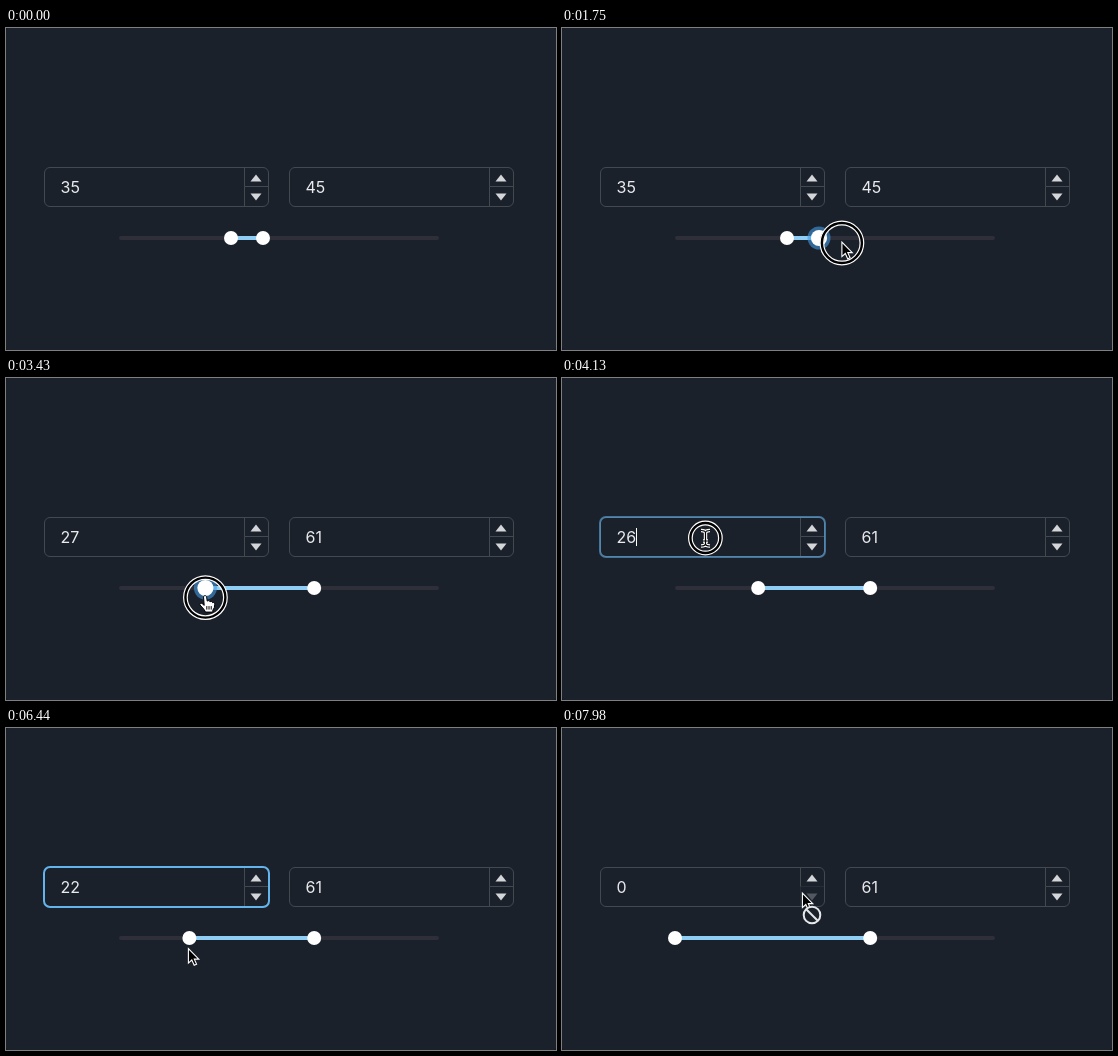
An HTML page with a canvas that plays this animation: 550 px wide and 322 px high, repeating every 8 s.

```html
<!DOCTYPE html>
<html lang="en">
<head>
<meta charset="utf-8">
<title>Range slider with number inputs</title>
<style>
  html, body { margin: 0; width: 100%; height: 100%; overflow: hidden; background: #14181f; }
  canvas { display: block; width: 550px; height: 322px; }
</style>
</head>
<body>
<canvas></canvas>
<script>
const LOOP = 8000, STEP = 70;
const BG = '#1b212b', BORDER = '#434851', BLUE = '#63b3ed';
const TRACK_X = 113, TRACK_Y = 210, UNIT = 3.2;
const canvas = document.querySelector('canvas');
const ctx = canvas.getContext('2d');
const dpr = window.devicePixelRatio || 1;
canvas.width = 550 * dpr;
canvas.height = 322 * dpr;

// Stops of the pointer: [time, x, y], eased in between
const stops = [
  [140, 236, 304], [280, 283, 251], [490, 283, 251], [1260, 263, 209],
  [1540, 262, 210], [1750, 279.5, 213], [1890, 279.5, 213], [2030, 257, 215],
  [2660, 308, 217.5], [2730, 308, 217.5], [3150, 225, 214], [3500, 196, 218],
  [4060, 143, 160], [4130, 143, 160], [4340, 9, 155], [6090, 60, 165],
  [6440, 182, 219.5], [6580, 183, 212], [7140, 96.5, 204], [7420, 491, 165],
  [7700, 266, 149], [7910, 266, 149], [7980, 240, 164],
];

// Each press moves the focus to what lies under the pointer
const presses = [
  { from: 1540, to: 2730, on: 'high' },
  { from: 3150, to: 3570, on: 'low' },
  { from: 4060, to: 4410, on: 'input' },
  { from: 6580, to: 7210, on: 'low' },
  { from: 7770, to: 7980, on: 'page' },
];
const textPress = presses[2], lastDrag = presses[3];

const clamp = (v, min, max) => Math.max(min, Math.min(max, v));
const between = (t, a, b) => t >= a && t < b;
const mid = v => TRACK_X + v * UNIT;

// Rises from 0 to 1 after a, falls back after b
const ramp = (t, a, b = Infinity) => clamp(Math.min((t - a) / 200, 1 - (t - b) / 200), 0, 1);
const rampFor = (part, t) =>
  Math.max(...presses.filter(p => p.on === part).map(p => ramp(t, p.from, p.to)));

function pointerAt(t) {
  const i = stops.findIndex(s => s[0] > t);
  if (i < 1) return stops.at(i && -1).slice(1);
  const [t0, x0, y0] = stops[i - 1], [t1, x1, y1] = stops[i];
  const p = (t - t0) / (t1 - t0), e = p * p * (3 - 2 * p);
  return [x0 + (x1 - x0) * e, y0 + (y1 - y0) * e];
}

// Value under the pointer during a drag
const dragged = (t, from, to) =>
  Math.round(clamp((pointerAt(clamp(t, from, to))[0] - TRACK_X) / UNIT, 0, 100));

function lowAt(t) {
  if (t >= lastDrag.from) return dragged(t, lastDrag.from, 7140);
  const arrowKeys = clamp(Math.floor((t - 5090) / 185) + 1, 0, 4);
  return dragged(t, 3150, 3500) - arrowKeys;
}
const highAt = t => dragged(t, 2030, 2660);

function polygon(...points) {
  ctx.beginPath();
  for (let i = 0; i < points.length; i += 2) ctx.lineTo(points[i], points[i + 1]);
  ctx.closePath();
}

function line(...points) {
  ctx.beginPath();
  for (let i = 0; i < points.length; i += 2) ctx.lineTo(points[i], points[i + 1]);
  ctx.stroke();
}

function box(x, y, w, h, r) {
  ctx.beginPath();
  ctx.roundRect(x, y, w, h, r);
}

function disc(x, y, r, fill) {
  ctx.beginPath();
  ctx.arc(x, y, r, 0, 7);
  ctx.fillStyle = fill;
  ctx.fill();
}

function ring(x, y, r, color, width) {
  ctx.beginPath();
  ctx.arc(x, y, r, 0, 7);
  ctx.strokeStyle = color;
  ctx.lineWidth = width;
  ctx.stroke();
}

function numberInput(x, value, focus, downOpacity) {
  ctx.lineWidth = 1;
  ctx.strokeStyle = BORDER;
  box(x + .5, 139.5, 224, 39, 5.5);
  ctx.stroke();

  ctx.fillStyle = '#d3d5d9';
  polygon(x + 206.5, 153.5, x + 212, 146.5, x + 217.5, 153.5);
  ctx.fill();
  line(x + 200.5, 140, x + 200.5, 158.5);
  ctx.globalAlpha = downOpacity;
  polygon(x + 206.5, 165.5, x + 217.5, 165.5, x + 212, 172.5);
  ctx.fill();
  line(x + 200.5, 178, x + 200.5, 158.5, x + 224, 158.5);

  ctx.globalAlpha = focus;
  ctx.strokeStyle = BLUE;
  ctx.lineWidth = 2;
  box(x, 139, 225, 40, 6);
  ctx.stroke();
  ctx.globalAlpha = 1;

  ctx.font = '16px Inter, sans-serif';
  ctx.fillStyle = '#e9eaec';
  ctx.fillText(value, x + 16.5, 165);
}

function thumb(value, part, focused, t) {
  const scale = 1 + .15 * rampFor(part, t);
  if (focused === part) disc(mid(value), TRACK_Y, 10 * scale, 'rgba(66,153,225,.6)');
  disc(mid(value), TRACK_Y, 7 * scale, '#fff');
}

function slider(low, high, focused, t) {
  ctx.fillStyle = '#2e2f38';
  box(TRACK_X, TRACK_Y - 2, 320, 4, 2);
  ctx.fill();
  ctx.fillStyle = '#90cdf4';
  ctx.fillRect(mid(low), TRACK_Y - 2, (high - low) * UNIT, 4);
  thumb(low, 'low', focused, t);
  thumb(high, 'high', focused, t);
}

function paint(path, fill, stroke, width) {
  ctx.fillStyle = fill;
  ctx.fill(path);
  ctx.strokeStyle = stroke;
  ctx.lineWidth = width;
  ctx.stroke(path);
}

const arrowPath = new Path2D('M.4 1V15.6L3.8 12.5L6.2 17.8L8.6 16.8L6.3 11.6H10.8Z');
const handPath = new Path2D('M-1.5 1.5C-1.5-.5 1.5-.5 1.6 1.5L2.2 5.5C3.5 4.6 4.8 5 5 6.2' +
  'C6.2 5.4 7.4 6 7.6 7.1C9 6.6 9.8 7.4 9.7 9L9.3 12L7.8 14.6V16.5H.5' +
  'L-1.2 13.6L-5 9.4C-5.6 8-3.8 7-2.4 8.4L-.8 9.8Z');
const fingersPath = new Path2D('M1.8 10.5V14M4 10.5V14M6.2 10.5V14');
const beamPath = new Path2D('M-4-7.5Q0-7.5 .5-5.5Q1-7.5 5-7.5M.5-5.5V6' +
  'M-4 8Q0 8 .5 6Q1 8 5 8M-2 3H3');

const cursors = {
  arrow: () => paint(arrowPath, '#000', '#fff', 1.1),
  hand() {
    paint(handPath, '#fff', '#000', 1);
    ctx.stroke(fingersPath);
  },
  beam() {
    paint(beamPath, 'transparent', '#fff', 3.4);
    paint(beamPath, 'transparent', '#000', 1.2);
  },
  blocked() {
    cursors.arrow();
    disc(10, 23, 8.3, BG);
    ring(10, 23, 8.3, '#e6e7e9', 2);
    line(4.2, 17.2, 15.8, 28.8);
  },
};

function cursorKind(x, y, low, high, t) {
  const inside = (left, right, top) => between(x, left, right) && between(y, top, 179);
  const overThumb = v => Math.hypot(x - mid(v), y - TRACK_Y) < 9;
  const selecting = between(t, textPress.from, textPress.to);
  if (selecting || inside(38, 238, 139) || inside(283, 483, 139)) return 'beam';
  if (low === 0 && inside(238, 263, 159)) return 'blocked';
  return overThumb(low) || overThumb(high) ? 'hand' : 'arrow';
}

function drawPointer(low, high, t) {
  // Typing hides the pointer until it moves again
  if (t < 140 || between(t, 5040, 6090)) return;
  const [x, y] = pointerAt(t);
  const kind = cursorKind(x, y, low, high, t);
  const press = presses.find(p => between(t, p.from, p.to));
  ctx.save();
  ctx.translate(x, y);
  if (press) {
    const r = Math.min(22, 12 + (t - press.from) / 14);
    const cy = kind === 'beam' ? 0 : 2;
    ring(.4, cy, r - 2, '#000', 4);
    ring(.4, cy, r - .2, '#fff', 1.2);
    ring(.4, cy, r - 3.8, '#fff', 1.2);
  }
  cursors[kind]();
  ctx.restore();
}

function render(now) {
  const t = Math.floor((now % LOOP) / STEP) * STEP;
  const low = lowAt(t), high = highAt(t);
  const focused = presses.findLast(p => p.from <= t)?.on;
  const focus = 1 - (1 - ramp(t, textPress.from, lastDrag.from)) ** 2;

  ctx.setTransform(dpr, 0, 0, dpr, 0, 0);
  ctx.clearRect(0, 0, 550, 322);
  ctx.fillStyle = BG;
  box(0, 0, 550, 322, 3);
  ctx.fill();

  if (between(t, 4200, 5110)) {
    ctx.fillStyle = '#466a8f';
    ctx.fillRect(54.5, 150, 20, 18);
  }
  numberInput(38, low, focus, 1 - .7 * ramp(t, 7000));
  numberInput(283, high, 0, 1);
  if (between(t, 4060, 4200) || between(t, 5110, 5320) || between(t, 5670, 6090)) {
    ctx.fillStyle = '#fff';
    ctx.fillRect(74, 150, 1, 18);
  }
  slider(low, high, focused, t);
  drawPointer(low, high, t);
}

const start = performance.now();
(function frame() {
  render(performance.now() - start);
  requestAnimationFrame(frame);
})();
</script>
</body>
</html>
```
